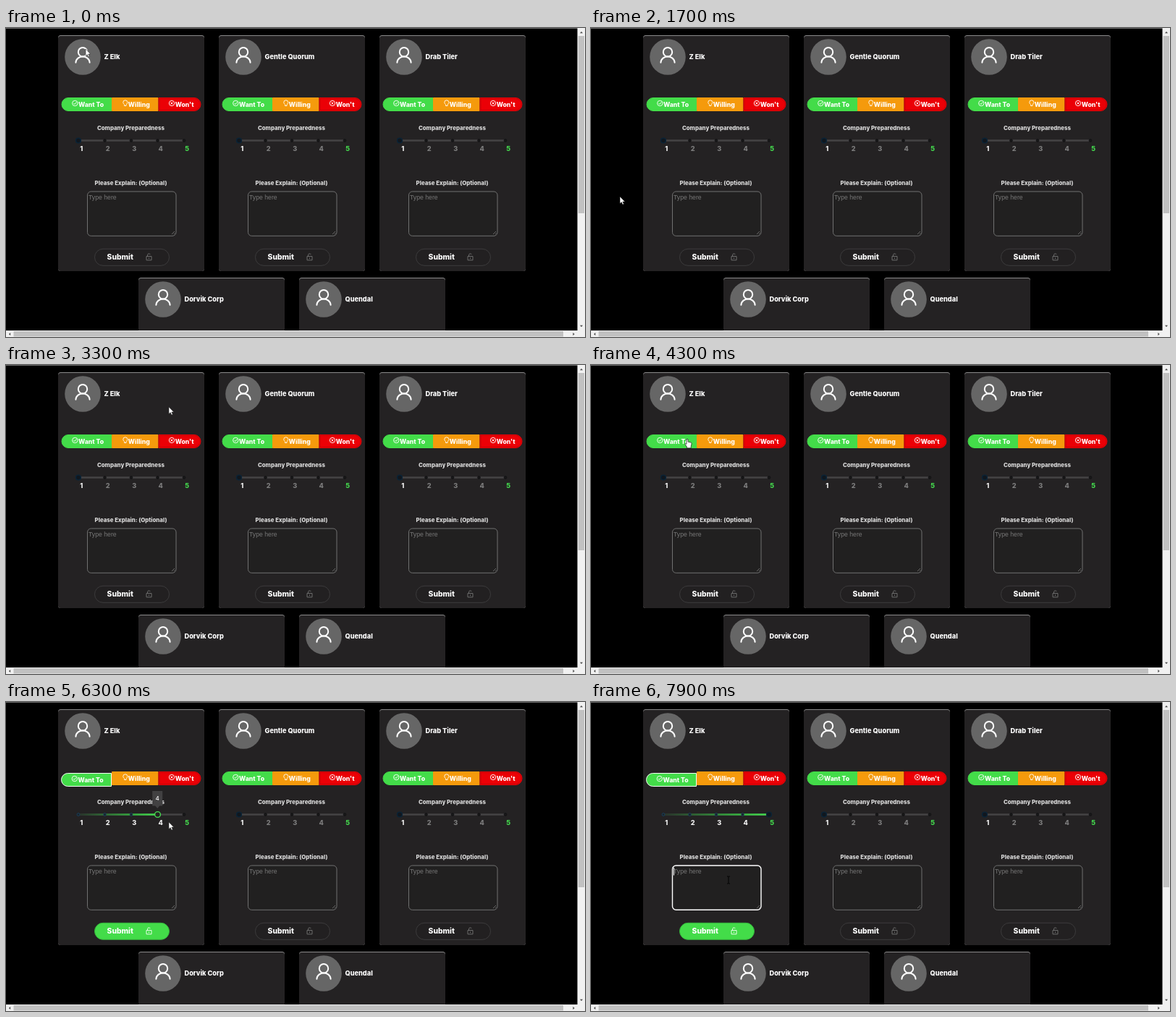
These frames come from a looping animation (800 px wide and 427 px high, 8000 ms). An HTML page:

```html
<!DOCTYPE html>
<html lang="en">
<head>
<meta charset="utf-8">
<title>Company cards</title>
<style>
  html, body { margin: 0; width: 100%; height: 100%; overflow: hidden; background: #000; }
  svg { display: block; width: 800px; height: 427px; }
  text { font: 800 9.2px Inter, Roboto, sans-serif; fill: #fff; }
  .name { font-size: 9.2px; }
  .choice text { font-size: 8.7px; }
  .label { font-size: 7.85px; fill: #dcdcdc; text-anchor: middle; }
  .num { fill: #7d7d7d; text-anchor: middle; }
  .num.on { fill: #f2f2f2; }
  .num.top { fill: #44d74d; }
  .hint { font: 400 8.7px "Liberation Sans", Arial, sans-serif; fill: #777; }
  .submit text { font-size: 10.3px; }
  .submit rect { fill: #222021; stroke: #3c3b3c; }
  .submit path { fill: none; stroke: #6c6c6c; }
  .picked .submit rect { fill: #43dc49; stroke: #35b53c; }
  .picked .submit path { stroke: #e6ffe6; }
  .picked .want { transform: translate(-.5px, 2px); }
  .picked .want .face { stroke: #f4fff4; }
  .icon { fill: none; stroke: #fff; stroke-width: .9; }
  .area { fill: #212020; stroke: #707070; }
  .focus .area { stroke: #fff; stroke-width: 1.4; }
  .dot { fill: #181818; stroke: #131416; stroke-width: .8; }
  .dot.on { fill: #1d2226; stroke: #15476a; }
  .handle { fill: #10171e; stroke: #0a2438; stroke-width: 1.4; }
  .handle.live { fill: #232122; stroke: #46df50; }
  .tip text { font-size: 8px; font-weight: 500; text-anchor: middle; }
</style>
</head>
<body>
<svg id="stage" viewBox="0 0 800 427" xmlns="http://www.w3.org/2000/svg"></svg>
<script>
const LOOP = 8000, STEP = 100;
const STOP_GAP = 36.5, TRACK_X = 28, TRACK_Y = 145.5;

const cards = [
  [72, 10, "Z Elk"], [294, 10, "Gentle Quorum"], [516, 10, "Drab Tiler"],
  [183, 345, "Dorvik Corp"], [405, 345, "Quendal"]
];

const choice = (kind, shape, color, icon, x, word) => `
  <g class="choice ${kind}">
    <path class="face" d="${shape}" fill="${color}" stroke="${color}" stroke-width="1"/>
    <g class="icon">${icon}</g><text x="${x}" y="98.7">${word}</text>
  </g>`;

const choices = () =>
  choice("want", "M74 86.5V104.5H14A9 9 0 0 1 14 86.5Z", "#43dc49",
    `<circle cx="23.3" cy="94" r="3.7"/><path d="M21.5 94l1.4 1.5 2.4-3"/>`, 28, "Want To") +
  choice("willing", "M74.5 86.5H138V104.5H74.5Z", "#f59a0c",
    `<path d="M91.6 95.8C90.3 94.7 89.8 93.7 89.8 92.8A3 3 0 0 1 95.8 92.8C95.8 93.7 95.3 94.7 94 95.8V97.5H91.6Z"/>`,
    96.8, "Willing") +
  choice("wont", "M139 86.5H188A9 9 0 0 1 188 104.5H139Z", "#eb0006",
    `<circle cx="157" cy="94" r="3.7"/><path d="M155.5 92.5l3 3m0-3l-3 3"/>
     <path d="M140 87.5H188A8 8 0 0 1 188 103.5H140Z" stroke="#8e0508" stroke-width=".7" stroke-dasharray="1 1"/>`,
    161.7, "Won't");

const stops = (make) => [0, 1, 2, 3, 4].map(make).join("");

const slider = () => `
  <rect x="${TRACK_X}" y="${TRACK_Y - 1.2}" width="${4 * STOP_GAP}" height="2.4" rx="1.2" fill="#444344"/>
  <rect class="fill" x="${TRACK_X}" y="${TRACK_Y - 1.2}" width="0" height="2.4" rx="1.2" fill="url(#glow)"/>
  ${stops(i => `<circle class="dot" cx="${TRACK_X + i * STOP_GAP}" cy="${TRACK_Y}" r="1.9"/>`)}
  <circle class="handle" cx="${TRACK_X}" cy="${TRACK_Y}" r="3.4"/>
  ${stops(i => `<text class="num${i ? "" : " on"}${i > 3 ? " top" : ""}" x="${32.2 + i * STOP_GAP}" y="159.6">${i + 1}</text>`)}`;

const card = ([x, y, name]) => `
  <g class="card" transform="translate(${x} ${y})">
    <rect width="202" height="326" rx="3.5" fill="#8b8a8b"/>
    <rect y="1" width="202" height="325" rx="3.5" fill="#242223"/>
    <circle cx="34" cy="30" r="24.8" fill="#666"/>
    <g fill="none" stroke="#fff" stroke-width="2" stroke-linecap="round">
      <circle cx="34" cy="23.2" r="6.2"/><path d="M24.4 37.8C25 26.8 43 26.8 43.6 37.8"/>
    </g>
    <text class="name" x="63.5" y="33">${name}</text>
    ${choices()}
    <text class="label" x="100.5" y="130.5">Company Preparedness</text>
    ${slider()}
    <text class="label" x="100.5" y="206.6">Please Explain: (Optional)</text>
    <rect class="area" x="40.5" y="216" width="122.5" height="61.3" rx="5"/>
    <path d="M157 275l4-4M160 275l1.5-1.5" stroke="#888" stroke-width=".7"/>
    <text class="hint" x="42" y="227">Type here</text>
    <g class="submit">
      <rect x="50.5" y="295.3" width="103" height="23" rx="11.5"/>
      <text x="67.6" y="310.2">Submit</text>
      <path d="M122 305.5H129V310.8H122ZM123.5 305.5V303.7A2 2 0 0 1 127.3 303M125.5 307.3V309"/>
    </g>
  </g>`;

const arrow = (x, y, dir) => `<path d="M-2 1.2L0 -1.2L2 1.2Z" fill="#505050" transform="translate(${x} ${y}) rotate(${dir})"/>`;

const scrollbars = `
  <path d="M789.5 0H800V427H0V418H789.5Z" fill="#f1f1f1"/>
  <rect x="790.8" y="11" width="8.2" height="245" fill="#c1c1c1"/>
  <rect x="10.5" y="419" width="759.5" height="7.5" fill="#c1c1c1"/>
  ${arrow(795, 6, 0)}${arrow(795, 412, 180)}${arrow(5, 423, -90)}${arrow(784.5, 423, 90)}`;

const pointers = `
  <g id="pointer">
    <path data-kind="arrow" d="M0 0V9.6L2.2 7.6L3.7 11L5.3 10.3L3.8 7H6.8Z" fill="#fff" stroke="#222" stroke-width=".5"/>
    <path data-kind="hand" d="M-1 .8Q0 -.6 1 .8V4.2L5.2 5.1Q6.2 5.5 6 7L5.2 10.5V12.8H-.6V11L-3.2 7.4Q-3.3 5.9 -1 7.3Z" fill="#fff" stroke="#111" stroke-width=".7"/>
    <path data-kind="beam" d="M-2 -5H-.6L0 -4.4L.6 -5H2M0 -4.4V4.4M-2 5H-.6L0 4.4L.6 5H2" fill="none" stroke="#000" stroke-width="1"/>
  </g>`;

const stage = document.getElementById("stage");
stage.innerHTML = `
  <defs><linearGradient id="glow">
    <stop stop-color="#263028"/><stop offset=".75" stop-color="#36b840"/><stop offset="1" stop-color="#46df50"/>
  </linearGradient></defs>
  <rect width="800" height="427"/>
  <rect width="790" height="1" fill="#666"/>
  ${cards.map(card).join("")}
  <rect id="caret" x="114" y="229" width="1" height="10.5" fill="#fff"/>
  <g id="tip" class="tip">
    <path d="M-7 123H7V143.5H3L0 147L-3 143.5H-7Z" fill="#424142"/><text y="136"></text>
  </g>
  ${scrollbars}${pointers}`;

const $ = (q, root = stage) => root.querySelector(q);
const first = $(".card"), tip = $("#tip"), pointer = $("#pointer"), caret = $("#caret");
const dots = first.querySelectorAll(".dot"), nums = first.querySelectorAll(".num");
const handle = $(".handle", first), fill = $(".fill", first);

// time, x, y
const path = [
  [0, 110, 29], [200, 340, 42], [400, 650, 90], [500, 768, 200], [700, 560, 390],
  [900, 250, 385], [1100, 95, 330], [1400, 48, 260], [1700, 40, 233], [1800, 26, 66],
  [2000, 75, 16], [2300, 250, 24], [2600, 262, 70], [2900, 235, 66], [3300, 225, 58],
  [3600, 200, 100], [3900, 160, 103], [4300, 133, 102], [4700, 120, 103], [4900, 118, 105],
  [5300, 106, 152], [5500, 108, 155], [5700, 112, 157], [6300, 225, 166], [6500, 251, 164],
  [6700, 240, 185], [6900, 200, 240], [7100, 190, 246], [LOOP, 190, 246]
];
const PICK = 4700, HOVER = 5300, DRAG = 5600, DROP = 6600, FOCUS = 6900;

function pointerAt(t) {
  const i = path.findIndex(p => p[0] > t);
  const [t0, x0, y0] = path[i - 1], [t1, x1, y1] = path[i];
  const k = (t - t0) / (t1 - t0);
  return [x0 + (x1 - x0) * k, y0 + (y1 - y0) * k];
}

function pointerKind(t, x, y) {
  const inside = (l, top, r, b) => x > l && x < r && y > top && y < b;
  if (inside(112, 226, 235, 287)) return "beam";
  const onCard = cards.some(([cx, cy]) => inside(cx + 4, cy + 86, cx + 197, cy + 105));
  return onCard || inside(95, 150, 250, 162) ? "hand" : "arrow";
}

function valueAt(t) {
  if (t < DRAG) return 0;
  if (t >= DROP) return 4;
  return Math.max(0, Math.min(4, Math.round((pointerAt(t)[0] - 100) / STOP_GAP)));
}

const show = (el, on) => el.setAttribute("visibility", on ? "visible" : "hidden");

function draw(t) {
  const [x, y] = pointerAt(t), kind = pointerKind(t, x, y);
  pointer.setAttribute("transform", `translate(${x} ${y})`);
  for (const p of pointer.children) show(p, p.dataset.kind === kind);

  first.classList.toggle("picked", t >= PICK);
  first.classList.toggle("focus", t >= FOCUS);
  show(caret, t >= FOCUS && (t - FOCUS) % 1000 < 500);

  const value = valueAt(t), live = t >= HOVER && t < DROP, offset = value * STOP_GAP;
  handle.setAttribute("cx", TRACK_X + offset);
  handle.setAttribute("r", live ? 3.9 : 3.4);
  handle.classList.toggle("live", live);
  fill.setAttribute("width", offset);
  dots.forEach((d, i) => d.classList.toggle("on", value > 0 && i <= value));
  nums.forEach((n, i) => n.classList.toggle("on", i <= value));

  show(tip, live);
  tip.setAttribute("transform", `translate(${100 + offset - .3} 0)`);
  tip.lastElementChild.textContent = value + 1;
}

function tick() {
  draw(Math.floor(performance.now() % LOOP / STEP) * STEP);
  requestAnimationFrame(tick);
}
tick();
</script>
</body>
</html>
```
